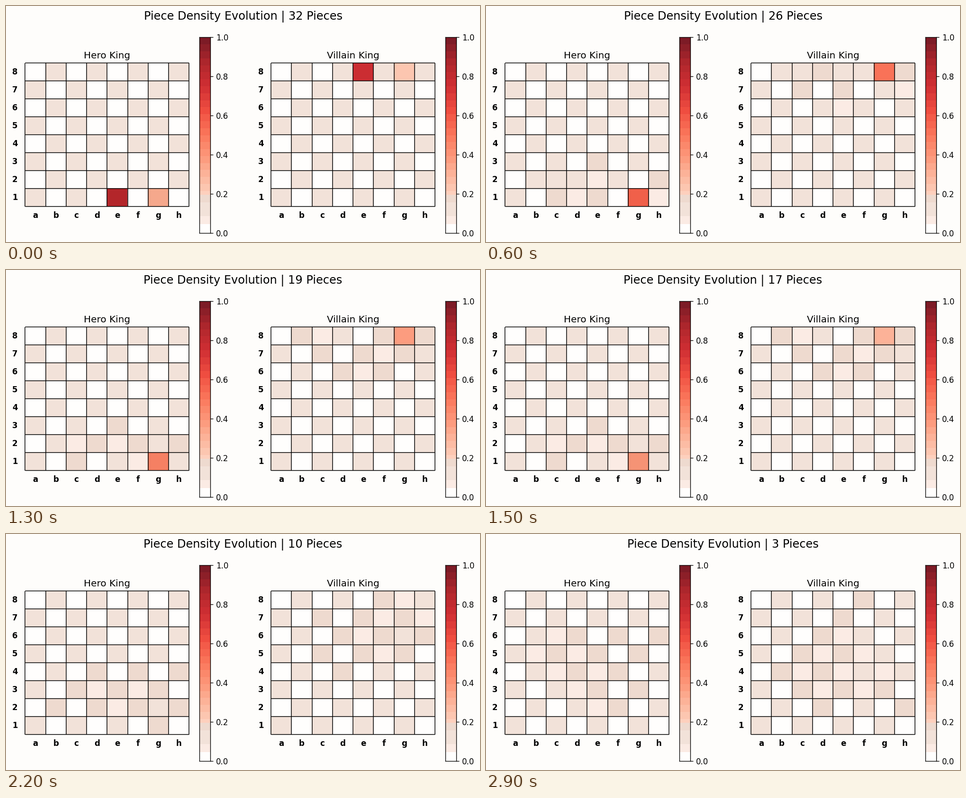
A matplotlib script for the animation above (3000 ms loop, 1000 px wide and 500 px high).

```python
import numpy as np
import matplotlib.pyplot as plt
from matplotlib.animation import FuncAnimation
from matplotlib.colors import to_rgb

W, H, DPI = 1000, 500, 120
FRAMES, INTERVAL = 30, 100
BANDS = 28
FILES = "abcdefgh"

BACKGROUND = "#fefdfb"
LIGHT, DARK = to_rgb("#fffefd"), to_rgb("#f2e2d9")
LIGHT_TINT, DARK_TINT = to_rgb("#fbebe4"), to_rgb("#eedacf")

# Squares visited now and then at each key step; "+" marks a stronger tint.
KEY_STEPS = np.array([0, 6, 10, 15, 22, 26, 29])
HERO_VISITS = [
    "",
    "c1 d1 e1 h1 c2+ e2 h2 e3",
    "c1 e1 h1 c2+ e2 f2 g2 h2 e3",
    "c1 f1 h1+ c2 d2 e2 f2 g2+ h2 e3",
    "g1 b2 d2 e2 f2 g2+ h2 c3 d3 e3 f3 g3 d4 f4 h4",
    "g1 d2 e2 f2 g2 h2 c3 d3 e3 f3 g3 b4 c4 d4 f4 g4 e5 f5 g5 h5 b6 g6",
    "e2 f2 d3 e3 g3 c4 d4 e4 f4 b5 c5 d5 e5 g5 c6 d6 f6 h6",
]
VILLAIN_VISITS = [
    "",
    "c8+ d8 e8+ h8 c7 e7 h7 e6",
    "b8 c8+ f8 h8 c7 e7 g7 h7 e6",
    "b8 c8 f8 h8 c7 e7 f7 g7 h7+ d6 e6 f6",
    "f8 g8 c7 e7 f7 g7 h7 d6 e6 f6 g6+ h6 c5 e5 f5 g5 d4",
    "d8 f8 g8 c7 e7 g7 h7 c6 d6 e6 f6 c5 d5 e5 f5 g5 b4 d4 f4 g4 h4 e3 g3",
    "f8 e7 d6 e6 c5 d5 e5 f5 b4 c4 d4 e4 g4 c3 d3 e3 f3 g3 d2 h2",
]

# Main king squares: (steps, density).
HERO_PEAKS = {
    "e1": ([0, 2, 6], [0.84, 0.45, 0.12]),
    "g1": ([0, 2, 6, 10, 15, 22], [0.29, 0.5, 0.57, 0.56, 0.38, 0.1]),
}
VILLAIN_PEAKS = {
    "e8": ([0, 2, 6], [0.77, 0.42, 0.1]),
    "g8": ([0, 2, 6, 10, 15, 22], [0.23, 0.44, 0.51, 0.5, 0.29, 0.06]),
}


def shade(value):
    """Banded red scale, pale at the low end."""
    for limit, color in ((0.045, LIGHT), (0.085, LIGHT_TINT),
                         (0.155, DARK), (0.195, DARK_TINT)):
        if value < limit:
            return color
    band = (min(int(value * BANDS), BANDS - 1) + 0.5) / BANDS
    return 0.9 * np.array(plt.cm.Reds(band)[:3]) + 0.1


def locate(square):
    return int(square[1]) - 1, FILES.index(square[0])


def is_dark(row, col):
    return (row + col) % 2 == 0


def board_colors(step, visits, peaks):
    cells = np.array([[DARK if is_dark(r, c) else LIGHT for c in range(8)]
                      for r in range(8)])
    for square in visits[np.argmin(abs(KEY_STEPS - step))].split():
        row, col = locate(square)
        if is_dark(row, col):
            cells[row, col] = DARK_TINT
        else:
            cells[row, col] = DARK if square.endswith("+") else LIGHT_TINT
    for square, (steps, densities) in peaks.items():
        density = np.interp(step, steps, densities)
        if density > 0.195:
            row, col = locate(square)
            under = np.sqrt(DARK) if is_dark(row, col) else 1
            cells[row, col] = shade(density) * under
    return cells


def add_axes(left, top, right, bottom):
    return fig.add_axes([left / W, 1 - bottom / H,
                         (right - left) / W, (bottom - top) / H])


def make_board(left, title):
    ax = add_axes(left, 120.6, left + 345.9, 424.7)
    image = ax.imshow(np.ones((8, 8, 3)), origin="lower", extent=(0, 8, 0, 8),
                      aspect="auto", interpolation="nearest")
    ax.set_xticks([])
    ax.set_yticks([])
    ax.set_title(title, fontsize=12)
    for side in ax.spines.values():
        side.set_visible(False)
    lines = np.arange(9)
    ax.vlines(lines, 0, 8, color="black", lw=0.9, clip_on=False)
    ax.hlines(lines, 0, 8, color="black", lw=0.9, clip_on=False, snap=False)
    label = dict(ha="center", va="center", fontsize=10, weight="bold")
    for i in range(8):
        ax.text(i + 0.5, -0.5, FILES[i], **label)
        ax.text(-0.5, i + 0.5, str(i + 1), **label)

    bar = add_axes(left + 367.3, 65.7, left + 391, 480.7)
    scale = np.array([[shade(v)] for v in np.linspace(0, 1, 415)])
    bar.imshow(scale, origin="lower", extent=(0, 1, 0, 1), aspect="auto",
               interpolation="nearest")
    bar.set_xticks([])
    bar.yaxis.tick_right()
    bar.set_yticks(np.linspace(0, 1, 6))
    bar.yaxis.set_major_formatter("{x:.1f}")
    return image


plt.rcParams.update({"font.family": "DejaVu Sans", "font.size": 10})
fig = plt.figure(figsize=(W / DPI, H / DPI), dpi=DPI, facecolor=BACKGROUND)
heading = fig.suptitle("", fontsize=14.4)
hero = make_board(40.4, "Hero King")
villain = make_board(559.2, "Villain King")


def update(step):
    heading.set_text(f"Piece Density Evolution | {32 - step} Pieces")
    hero.set_data(board_colors(step, HERO_VISITS, HERO_PEAKS))
    villain.set_data(board_colors(step, VILLAIN_VISITS, VILLAIN_PEAKS))
    return heading, hero, villain


anim = FuncAnimation(fig, update, frames=FRAMES, interval=INTERVAL, repeat=True)
plt.show()
```
